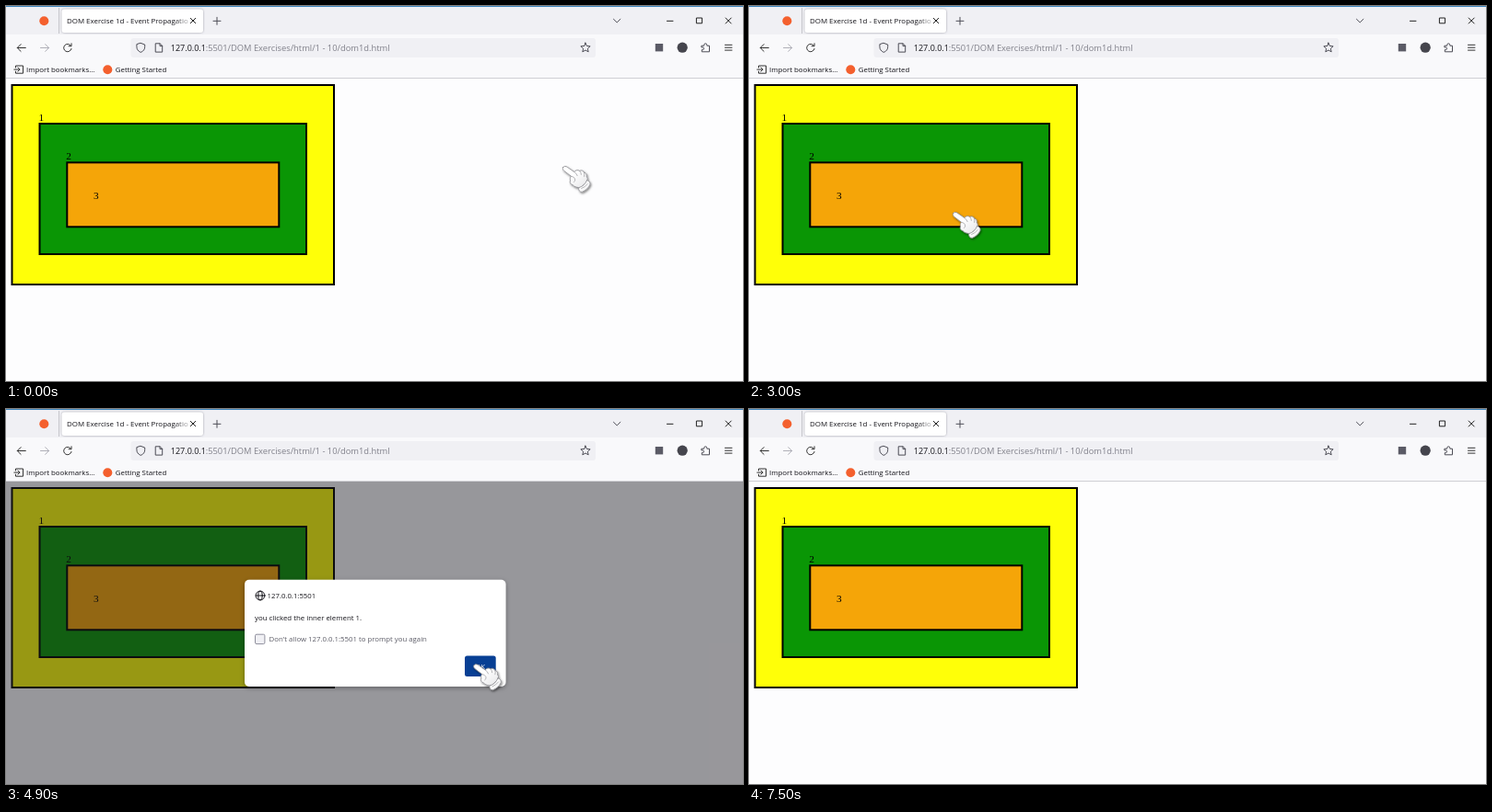
An HTML page for the animation above (7600 ms loop, 800 px wide and 408 px high).

```html
<!DOCTYPE html>
<html lang="en">
<head>
<meta charset="utf-8">
<title>Event propagation demo</title>
<style>
  html, body { margin: 0; width: 100%; height: 100%; overflow: hidden; background: #fdfdfe; }
  svg { display: block; width: 800px; height: 408px; }
  text { font: 7.85px "Open Sans", "Noto Sans", sans-serif; fill: #15141a; white-space: pre; }
  .num { font: 11.3px "Liberation Serif", "DejaVu Serif", serif; fill: #000; }
  .icon { fill: none; stroke: #4c4c55; stroke-width: 1; stroke-linecap: round; stroke-linejoin: round; }
  .box { stroke: #000; stroke-width: 2; }
  .ok { fill: #fff; text-anchor: middle; }
</style>
</head>
<body>
<svg viewBox="0 0 800 408">
  <defs>
    <linearGradient id="fade" gradientUnits="userSpaceOnUse" x1="182" x2="199" y1="0" y2="0">
      <stop offset="0" stop-color="#fff" stop-opacity="0"/>
      <stop offset="1" stop-color="#fff" stop-opacity=".75"/>
    </linearGradient>
    <linearGradient id="glove" x1="0" y1="0" x2="1" y2="1">
      <stop offset=".4" stop-color="#fff"/>
      <stop offset="1" stop-color="#e6e6e8"/>
    </linearGradient>
    <clipPath id="tabClip"><rect x="60" y="3" width="137.5" height="27"/></clipPath>
    <filter id="soft" x="-20%" y="-30%" width="140%" height="170%">
      <feDropShadow dx="0" dy="1.5" stdDeviation="2.5" flood-color="#000" flood-opacity=".35"/>
    </filter>
    <filter id="tabShade" x="-5%" y="-20%" width="110%" height="140%">
      <feDropShadow dx="0" dy="0" stdDeviation="1.1" flood-color="#606070" flood-opacity=".6"/>
    </filter>
    <filter id="handShade" x="-30%" y="-30%" width="170%" height="170%">
      <feDropShadow dx="1" dy="1.3" stdDeviation=".9" flood-color="#000" flood-opacity=".5"/>
    </filter>
  </defs>

  <!-- page -->
  <rect width="800" height="408" fill="#fdfdfe"/>
  <g class="box">
    <rect x="6.5" y="86" width="349.5" height="217" fill="#ffff08"/>
    <rect x="36.5" y="128" width="289.5" height="142" fill="#0a9605"/>
    <rect x="66.3" y="170.3" width="230" height="70" fill="#f5a508"/>
  </g>
  <text class="num" x="35.5" y="125">1</text>
  <text class="num" x="65.2" y="167">2</text>
  <text class="num" x="95" y="209.7">3</text>
  <rect id="dim" y="79" width="800" height="329" fill="#1c1b22" fill-opacity=".45"/>

  <!-- tab strip -->
  <rect width="800" height="31" fill="#f0f0f4"/>
  <rect width="800" height="1" fill="#3f86bd"/>
  <path d="M57.5 2V30" stroke="#c6c6cc"/>
  <circle cx="41.3" cy="16.3" r="5" fill="#f4602e"/>
  <rect x="60.5" y="3.5" width="153.5" height="25.5" rx="3" fill="#fff" filter="url(#tabShade)"/>
  <g clip-path="url(#tabClip)">
    <text x="66" y="19.3" style="font-size:7.92px">DOM Exercise 1d - Event Propagation</text>
    <rect x="182" y="8" width="17" height="17" fill="url(#fade)"/>
  </g>
  <g class="icon">
    <path d="M200.3 13.3l5.4 5.4m0-5.4l-5.4 5.4" stroke="#222"/>
    <path d="M225 16.3h8m-4-4v8"/>
    <path d="M659.5 14.3l3.7 3.6 3.7-3.6"/>
    <path d="M717.5 16.3h6.5M749.8 13h5.8v5.8h-5.8zM781.2 13l6 6m0-6l-6 6" stroke="#222"/>
  </g>

  <!-- toolbars -->
  <rect y="31" width="800" height="48" fill="#f9f9fb"/>
  <rect y="78" width="800" height="1" fill="#cfcfd4"/>
  <rect x="135.5" y="35" width="504.5" height="21" rx="3" fill="#f0f0f4"/>
  <g class="icon">
    <path d="M21.3 45.5h-9m3.8-3.9l-3.9 3.9 3.9 3.9" stroke="#333"/>
    <path d="M37.5 45.5h9m-3.8-3.9l3.9 3.9-3.9 3.9" stroke="#b0b0b8"/>
    <path d="M70.4 43.2a4.2 4.2 0 1 0 .6 3.3M71 40.8v2.9h-2.9" stroke="#333"/>
    <path d="M146.3 40.4l4.4 1.6v2.4q0 4.1-4.4 6-4.4-1.9-4.4-6V42z"/>
    <path d="M162.6 40.8h4.6l2.5 2.5v6.8h-7.1zM167 41v2.5h2.5"/>
    <path id="star"/>
    <path d="M755.3 43.2h2.5v-.9a1.5 1.5 0 0 1 3 0v.9h2.7v6.6h-8.2v-2.2h1a1.3 1.3 0 0 0 0-2.6h-1z"/>
    <path d="M780.5 42.3h7.5m-7.5 2.9h7.5m-7.5 2.9h7.5" stroke="#333"/>
    <path d="M10.5 67v-2h8v8.2h-8v-2M8.8 69.1h6m-2-2.2l2.2 2.2-2.2 2.2" stroke="#333"/>
  </g>
  <rect x="704.8" y="41" width="8.4" height="8.4" fill="#5b5b66"/>
  <circle cx="734.2" cy="45.2" r="5.6" fill="#45454d"/>
  <text x="178.8" y="48.7" style="font-size:9px">127.0.0.1</text>
  <text x="216.7" y="48.7" style="font-size:9.36px;fill:#80808a">:5501/DOM Exercises/html/1 - 10/dom1d.html</text>
  <text x="22" y="72.2">Import bookmarks...</text>
  <circle cx="110.3" cy="69.3" r="5" fill="#f4602e"/>
  <text x="118.8" y="72.2">Getting Started</text>

  <!-- alert -->
  <g id="dialog">
    <rect id="panel" x="259" width="283.5" rx="5" fill="#fff" filter="url(#soft)"/>
    <g id="head">
      <g class="icon" stroke-width=".9">
        <circle cx="276" cy="17.3" r="4.9" style="stroke:#15141a"/>
        <ellipse cx="276" cy="17.3" rx="2.2" ry="4.9" style="stroke:#15141a"/>
        <path d="M271.1 17.3h9.8" style="stroke:#15141a"/>
      </g>
      <text x="283.6" y="20.2" style="font-size:7.75px">127.0.0.1:5501</text>
      <text id="message" x="270" y="44.5"></text>
      <g id="prompt">
        <rect x="270.5" y="59.5" width="10.4" height="10.4" rx="1.5" fill="#f0f0f4" stroke="#8f8f9d"/>
        <text x="285.5" y="67.7" style="font-size:7.8px;fill:#5b5b66">Don't allow 127.0.0.1:5501 to prompt you again</text>
      </g>
    </g>
    <g id="button">
      <rect x="498" width="33.7" height="22.5" rx="2.5" fill="#073f94"/>
      <text class="ok" x="514.6" y="14.3">OK</text>
    </g>
  </g>

  <!-- pointer -->
  <g id="hand" filter="url(#handShade)" stroke="#8a8a8e" stroke-width=".8" stroke-linejoin="round" stroke-linecap="round">
    <path fill="url(#glove)" d="M.6 1.6C1.6-.2 3.8.2 5.2 1.2L13 6.6C14 4.4 16.8 4 18.6 5.4C20.4 4.2 23 5.2 23.6 7.2C25.8 7.4 26.8 9.6 26.2 11.6C27.6 13.2 27.4 15.4 26.8 17.2L20 23.6C16.4 23.8 13 23 11 20.6C8.6 20.2 7.6 17.8 8.6 15.8C8 14 8.4 12.4 9.4 11.2L1.6 5.2C.4 4.2 0 2.8.6 1.6Z"/>
    <path fill="url(#glove)" d="M26.6 15.6C28.4 15.4 30.6 18 30 20.2C28.4 24 25 27 21.2 28.4C18.6 28.4 17 26 17.8 23.6C21.8 22.6 25 19.6 26.6 15.6Z"/>
    <path fill="none" stroke="#a4a4a8" d="M13 6.6Q15.4 8 16.2 10.6M18.6 5.4Q20.4 7 20.4 9.4M23.6 7.2Q24.4 9 23.6 11.4M9.4 11.2Q12.4 11.4 13.6 14Q14.4 16.6 12.4 17.6M20.6 24.6Q24.4 23.2 27.2 19.6"/>
  </g>
</svg>
<script>
const LOOP = 7600;
const $ = id => document.getElementById(id);
const show = (el, on) => el.setAttribute("visibility", on ? "inherit" : "hidden");
const move = (el, x, y) => el.setAttribute("transform", `translate(${x.toFixed(2)} ${y.toFixed(2)})`);

// time, x, y of the pointer tip
const path = [
  [0, 604, 174], [2300, 604, 174], [2900, 221, 224], [3300, 221, 224],
  [4000, 506, 275], [4700, 506, 275], [5300, 511, 284], [5900, 511, 284],
  [6000, 509, 283], [LOOP, 509, 283]
];
const alerts = [
  { from: 3100, to: 4500, top: 198, height: 91.5, text: "you clicked the outer element 2." },
  { from: 4500, to: 6000, top: 185.7, height: 116.3, text: "you clicked the inner element 1.", again: true }
];
const HAND_END = 7000;

function starPath(cx, cy, outer, inner) {
  const pts = Array.from({ length: 10 }, (_, i) => {
    const r = i % 2 ? inner : outer, a = (i / 5 - 0.5) * Math.PI;
    return (cx + r * Math.cos(a)).toFixed(2) + " " + (cy + r * Math.sin(a)).toFixed(2);
  });
  return "M" + pts.join("L") + "Z";
}

function tipAt(t) {
  const i = path.findIndex(p => p[0] > t);
  const [t0, x0, y0] = path[i - 1], [t1, x1, y1] = path[i];
  const u = (t - t0) / (t1 - t0), k = u * u * (3 - 2 * u);
  return [x0 + (x1 - x0) * k, y0 + (y1 - y0) * k];
}

function draw(t) {
  const a = alerts.find(d => t >= d.from && t < d.to);
  show($("dim"), a);
  show($("dialog"), a);
  if (a) {
    $("panel").setAttribute("y", a.top);
    $("panel").setAttribute("height", a.height);
    $("message").textContent = a.text;
    show($("prompt"), a.again);
    move($("head"), 0, a.top);
    move($("button"), 0, a.top + a.height - 33.4);
  }
  show($("hand"), t < HAND_END);
  move($("hand"), ...tipAt(t));
}

$("star").setAttribute("d", starPath(629, 45.5, 5.4, 2.5));
const start = performance.now();
function tick() {
  draw((performance.now() - start) % LOOP);
  requestAnimationFrame(tick);
}
draw(0);
requestAnimationFrame(tick);
</script>
</body>
</html>
```
